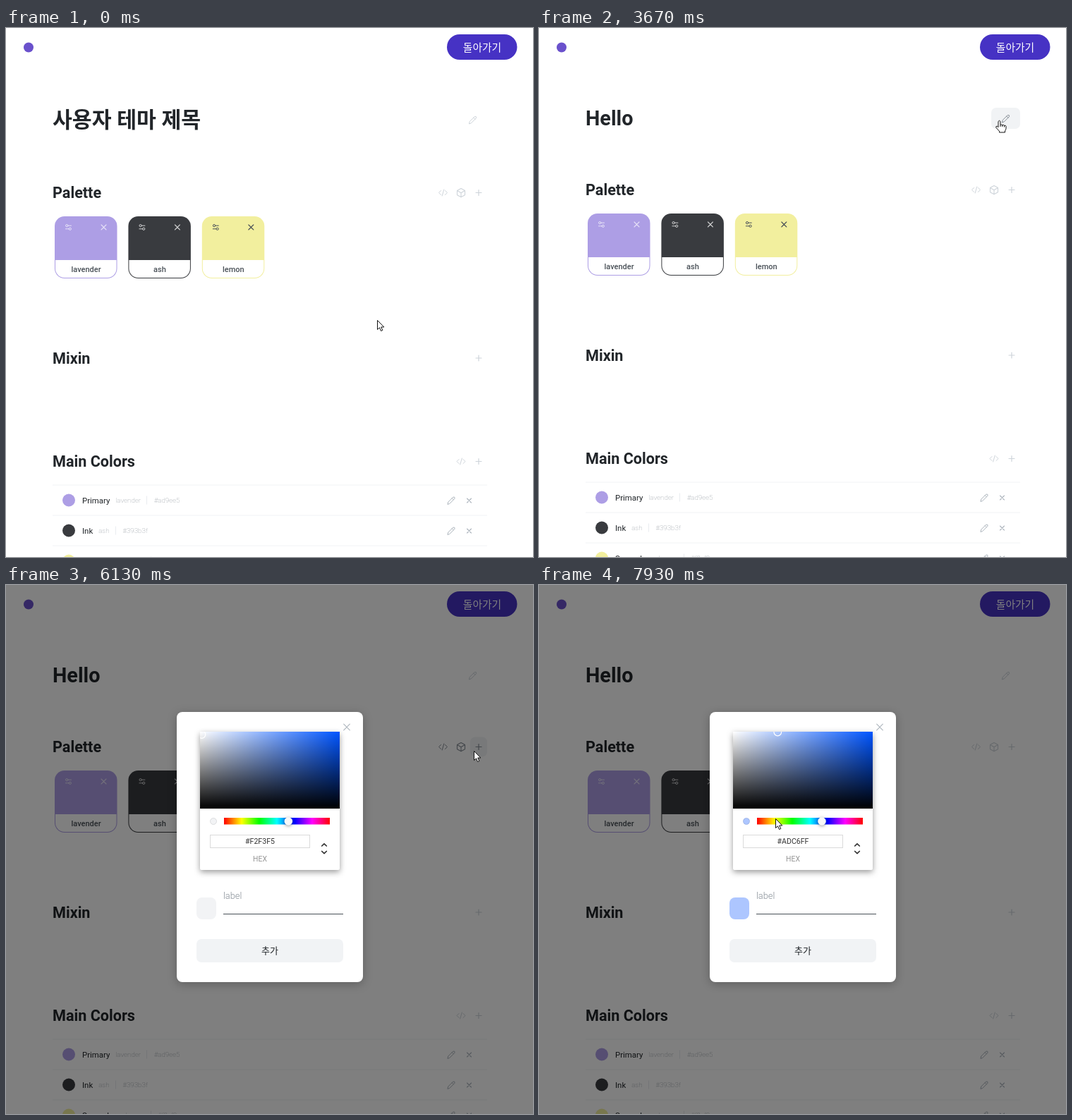
These frames come from a looping animation (747x750 px, 8 s). An HTML page with a canvas:

```html
<!DOCTYPE html>
<html lang="ko">
<head>
<meta charset="utf-8">
<style>
html, body { margin: 0; width: 100%; height: 100%; overflow: hidden; background: #fff; }
canvas { display: block; }
</style>
</head>
<body>
<canvas id="stage" width="747" height="750"></canvas>
<script>
const ctx = document.getElementById('stage').getContext('2d');
const LOOP = 8000;
const FONT = 'Roboto, "Noto Sans CJK KR", "Noto Sans CJK", sans-serif';
const INK = '#212529', GRAY = '#495057', MID = '#868e96', SOFT = '#adb5bd', PALE = '#ced4da', FILL = '#f1f3f5';
const COLORS = [
  { label: 'lavender', hex: '#ad9ee5', role: 'Primary', icon: '#ffffffb0' },
  { label: 'ash', hex: '#393b3f', role: 'Ink', icon: '#ffffffc0' },
  { label: 'lemon', hex: '#f2ef9e', role: 'Secondary', icon: '#495057' }
];

// time, x, y of the pointer's hot spot
const POINTER = [
  [210, 526, 414], [600, 640, 290], [850, 704, 170], [1070, 672, 134], [1530, 652, 131],
  [4930, 652, 131], [5000, 649, 131], [5330, 573, 257], [5470, 573, 257], [5800, 650, 238],
  [6000, 663, 235], [6350, 663, 235], [7060, 339, 206], [7130, 339, 204], [7370, 339, 204],
  [7700, 314, 331], [7930, 335, 331]
];
const TYPING = [[1670, ''], [2470, 'H'], [2730, 'He'], [2930, 'Hel'], [3130, 'Hell'], [3270, 'Hello']];
const EDIT_START = 1400, EDIT_END = 3670, LOADING = 6070, MODAL = 6130;

function pointerAt(t) {
  let a = POINTER[0];
  for (const b of POINTER) {
    if (t < b[0]) {
      if (a === b) break;
      const p = (t - a[0]) / (b[0] - a[0]), e = p * p * (3 - 2 * p);
      return { x: a[1] + (b[1] - a[1]) * e, y: a[2] + (b[2] - a[2]) * e };
    }
    a = b;
  }
  return { x: a[1], y: a[2] };
}

const inside = (p, x, y, w, h) => p.x >= x && p.x <= x + w && p.y >= y && p.y <= y + h;

// cy is the middle of the capital height
function text(str, x, cy, size, weight, color, align = 'left') {
  ctx.font = `${weight} ${size}px ${FONT}`;
  ctx.textAlign = align;
  ctx.fillStyle = color;
  ctx.fillText(str, x, cy + size * 0.355);
  return ctx.measureText(str).width;
}

function box(x, y, w, h, r, color) {
  ctx.fillStyle = color;
  ctx.beginPath();
  ctx.roundRect(x, y, w, h, r);
  ctx.fill();
}

function disc(x, y, r, color) {
  ctx.fillStyle = color;
  ctx.beginPath();
  ctx.arc(x, y, r, 0, Math.PI * 2);
  ctx.fill();
}

function ring(x, y, r, color, width = 1) {
  ctx.strokeStyle = color;
  ctx.lineWidth = width;
  ctx.beginPath();
  ctx.arc(x, y, r, 0, Math.PI * 2);
  ctx.stroke();
}

function lines(x, y, path, color, width = 1) {
  ctx.save();
  ctx.translate(x, y);
  ctx.strokeStyle = color;
  ctx.lineWidth = width;
  ctx.lineCap = ctx.lineJoin = 'round';
  ctx.stroke(new Path2D(path));
  ctx.restore();
}

const plus = (x, y, c) => lines(x, y, 'M-4 0H4M0 -4V4', c, 1.2);
const cross = (x, y, c, r = 3.5) => lines(x, y, `M${-r} ${-r}L${r} ${r}M${r} ${-r}L${-r} ${r}`, c, 1.1);
const pencil = (x, y, c) => lines(x, y, 'M-5 5L-4.2 2L2.8 -5Q5.8 -5.6 5 -2.8L-2 4.2ZM1.2 -3.4L3.4 -1.2', c);
const code = (x, y, c) => lines(x, y, 'M-3 -3L-6 0L-3 3M3 -3L6 0L3 3M1.3 -4.5L-1.3 4.5', c);
const cube = (x, y, c) => lines(x, y, 'M0 -6L5.5 -3V3.2L0 6.3L-5.5 3.2V-3ZM-5.5 -3L0 .2L5.5 -3M0 .2V6.3', c, 1.1);

function sliders(x, y, c) {
  lines(x, y, 'M-.5 -2.3H4M-4 2.3H.5', c);
  ring(x - 2.3, y - 2.3, 1.6, c);
  ring(x + 2.3, y + 2.3, 1.6, c);
}

function drawTitle(t, p, editing) {
  if (editing) {
    let value = '사용자 테마 제목';
    let typedAt = EDIT_START;
    for (const [at, v] of TYPING) if (t >= at) { value = v; typedAt = at; }
    const w = text(value, 66, 128, value.length > 5 ? 30.3 : 28.8, 300, INK);
    if (Math.floor((t - typedAt) / 600) % 2 === 0) {
      ctx.fillStyle = GRAY;
      ctx.fillRect(Math.round(66 + w), 111, 1, 34);
    }
    ctx.fillStyle = '#b3acd0';
    ctx.fillRect(66, 145.5, 490, 1);
    box(556, 113, 61, 31, 7, FILL);
    box(620.5, 113, 61.5, 31, 7, FILL);
    text('저장', 586.5, 128.5, 13, 400, INK, 'center');
    text('취소', 651, 128.5, 13, 400, '#4632c4', 'center');
    return inside(p, 620, 113, 62, 31);
  }
  const renamed = t >= EDIT_END;
  const y = renamed ? 128 : 130;
  const hover = t < MODAL && inside(p, 641, y - 15, 41, 30);
  if (renamed) text('Hello', 66, y, 28.8, 700, INK);
  else text('사용자 테마 제목', 66, y + 0.5, 30.3, 700, INK);
  if (hover) box(641, y - 15, 41, 30, 7, FILL);
  pencil(661.5, y + 0.5, hover ? MID : PALE);
  return hover;
}

function drawCard(c, x, y) {
  box(x, y, 88.5, 88, 14, c.hex);
  box(x + 1, y + 62, 86.5, 25, [0, 0, 13, 13], '#fff');
  sliders(x + 19.5, y + 15.5, c.icon);
  cross(x + 69.5, y + 15.5, c.icon);
  text(c.label, x + 44.5, y + 75, 11, 500, GRAY, 'center');
}

function drawRow(c, y) {
  ctx.fillStyle = FILL;
  ctx.fillRect(66, y - 22, 616, 1);
  disc(89, y, 9, c.hex);
  let x = 108;
  x += text(c.role, x, y, 11.4, 400, INK) + 8;
  x += text(c.label, x, y + 0.5, 9.8, 100, MID) + 8.5;
  ctx.fillStyle = '#e9ecef';
  ctx.fillRect(Math.round(x), y - 6, 1, 12);
  text(c.hex, x + 10.5, y + 0.5, 9.8, 100, MID);
  pencil(631, y + 0.5, SOFT);
  cross(656.5, y + 0.5, SOFT, 3);
}

function drawPage(t, p) {
  ctx.fillStyle = '#fff';
  ctx.fillRect(0, 0, 747, 750);
  disc(32, 27.5, 7, '#6a51cc');
  box(625, 9, 99.5, 36, 18, '#4632c4');
  text('돌아가기', 675, 27.5, 14.8, 500, '#fff', 'center');

  const editing = t >= EDIT_START && t < EDIT_END;
  const loading = t >= LOADING && t < MODAL;
  const dy = loading ? 13 : t < EDIT_START ? 0 : editing ? -2 : -4;
  let hand = drawTitle(t, p, editing);
  if (loading) text('...loading...', 374, 224.5, 14, 400, '#000', 'center');

  const y = 233.5 + dy;
  const rowHover = inside(p, 66, y - 18, 616, 36);
  const tone = rowHover ? MID : PALE;
  text('Palette', 66, y, 21.6, 700, INK);
  for (const x of [619.5, 645, 670]) {
    if (rowHover && Math.abs(p.x - x) < 12) {
      box(x - 12, y - 14, 24, 28, 7, FILL);
      hand = true;
    }
  }
  code(619.5, y, tone);
  cube(645, y, tone);
  plus(670, y, tone);
  COLORS.forEach((c, i) => drawCard(c, 69 + i * 104.4, 267 + dy));

  text('Mixin', 66, 468 + dy, 21.6, 700, INK);
  plus(670, 468 + dy, PALE);
  text('Main Colors', 66, 614 + dy, 21.6, 700, INK);
  code(645, 614.5 + dy, PALE);
  plus(670, 614.5 + dy, PALE);
  COLORS.forEach((c, i) => drawRow(c, 669.5 + dy + i * 43));
  return hand;
}

function shadowBox(x, y, w, h, r, blur, offset, alpha) {
  ctx.save();
  ctx.shadowColor = `rgba(0,0,0,${alpha})`;
  ctx.shadowBlur = blur;
  ctx.shadowOffsetY = offset;
  box(x, y, w, h, r, '#fff');
  ctx.restore();
}

function gradientRect(x, y, w, h, stops, vertical) {
  const g = ctx.createLinearGradient(x, y, vertical ? x : x + w, vertical ? y + h : y);
  stops.forEach((c, i) => g.addColorStop(i / (stops.length - 1), c));
  ctx.fillStyle = g;
  ctx.fillRect(x, y, w, h);
}

function drawModal(t) {
  const hex = t < 7060 ? '#F2F3F5' : t < 7200 ? '#ACC5FD' : '#ADC6FF';
  ctx.fillStyle = 'rgba(0,0,0,.5)';
  ctx.fillRect(0, 0, 747, 750);
  shadowBox(242, 180, 264, 383, 8, 14, 3, 0.25);
  cross(483, 201.5, SOFT, 4.3);

  shadowBox(275, 208, 198, 196, 2, 8, 3, 0.4);
  ctx.fillStyle = '#05f';
  ctx.fillRect(275, 208, 198, 109);
  gradientRect(275, 208, 198, 109, ['#fff', 'rgba(255,255,255,0)']);
  gradientRect(275, 208, 198, 109, ['rgba(0,0,0,0)', '#000'], true);
  ctx.save();
  ctx.beginPath();
  ctx.rect(275, 208, 198, 109);
  ctx.clip();
  if (t < 7060) ring(277.5, 212, 5.3, '#fff', 1.2);
  else ring(338.3, 208.5, 5.3, '#fff', 1.2);
  ctx.restore();

  disc(294, 335, 4.8, hex);
  ring(294, 335, 4.5, 'rgba(0,0,0,.12)', 0.8);
  gradientRect(309, 330, 150, 9.5, ['#f00', '#ff0', '#0f0', '#0ff', '#00f', '#f0f', '#f00']);
  ctx.save();
  ctx.shadowColor = 'rgba(0,0,0,.4)';
  ctx.shadowBlur = 4;
  ctx.shadowOffsetY = 1;
  disc(t < 7400 ? 400.3 : 401, 335, 5.8, '#f8f8f8');
  ctx.restore();

  ctx.strokeStyle = '#dadada';
  ctx.lineWidth = 1;
  ctx.strokeRect(289.5, 354.5, 141, 18);
  text(hex, 360, 363.5, 10.6, 400, '#333', 'center');
  text('HEX', 360, 388, 10.4, 400, '#969696', 'center');
  lines(451, 374, 'M-3.3 -4L0 -7.2L3.3 -4M-3.3 3.5L0 6.7L3.3 3.5', '#333', 1.7);

  text('label', 308, 440, 12.8, 300, MID);
  ctx.fillStyle = GRAY;
  ctx.fillRect(308, 466, 170, 1);
  box(270, 443, 28, 31, 8, hex);
  box(270, 502, 208, 33, 7, FILL);
  text('추가', 374, 518.5, 13, 400, INK, 'center');
}

const ARROW = new Path2D('M0 0V13L3 10.3L5 15L7.3 14L5.2 9.5H9.3Z');
const HAND = new Path2D('M-1.5 1Q0 -1.5 1.5 1V6Q3 4.8 4.3 6.2Q6 5.2 7 6.8Q9 6 9.5 8V11Q9.3 13 8 14.5V16.5H0V14.8L-4.7 9.6Q-5.2 7.5 -3 7.8L-1.5 9.2Z');

function drawPointer(p, hand) {
  ctx.save();
  ctx.translate(Math.round(p.x) + 0.5, Math.round(p.y) + 0.5);
  ctx.fillStyle = '#fff';
  ctx.strokeStyle = '#111';
  ctx.lineWidth = 1;
  ctx.lineJoin = 'round';
  const shape = hand ? HAND : ARROW;
  ctx.fill(shape);
  ctx.stroke(shape);
  if (hand) ctx.stroke(new Path2D('M1.5 6V8.5M4.3 6.2V8.7M7 6.8V9'));
  ctx.restore();
}

function frame(now) {
  const t = now % LOOP;
  const p = pointerAt(t);
  const hand = drawPage(t, p);
  if (t >= MODAL) drawModal(t);
  drawPointer(p, hand && t < MODAL);
  requestAnimationFrame(() => frame(performance.now() - start));
}

const start = performance.now();
frame(0);
</script>
</body>
</html>
```
